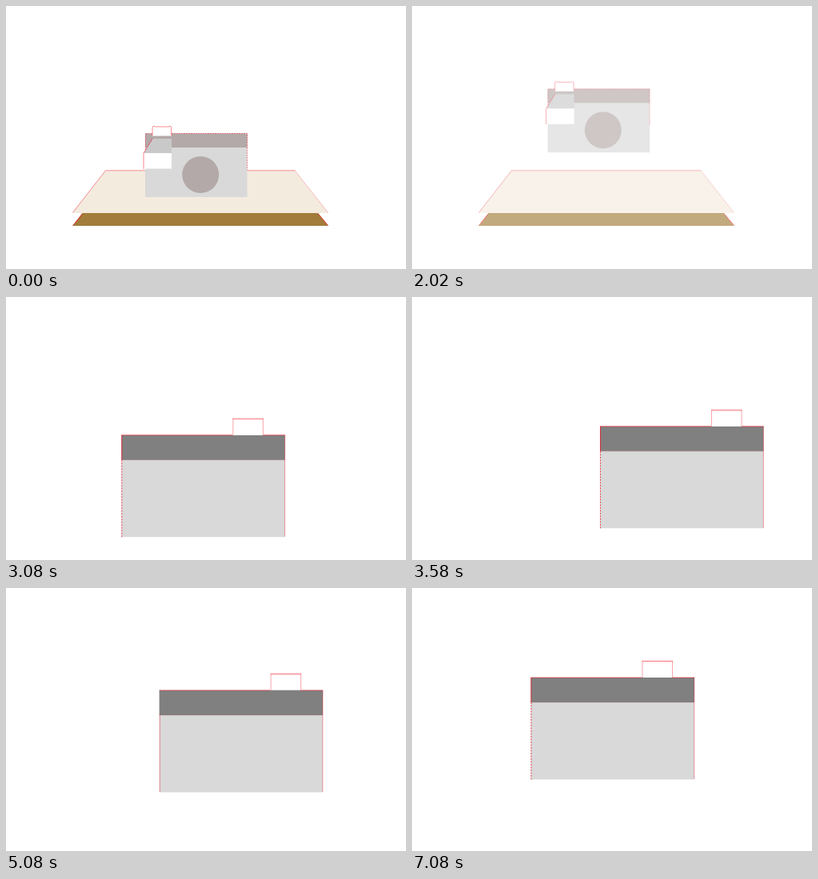
Write an HTML page that moves like this. It is 500 px wide and 329 px high and loops after 8 s.

```html
<!DOCTYPE html>
<html lang="en">
<head>
<meta charset="utf-8">
<title>Camera slides</title>
<style>
  html, body { margin: 0; width: 100%; height: 100%; overflow: hidden; background: #fff; }
  svg { display: block; width: 100vw; height: 100vh; }
  .edge { fill: none; stroke: #f01e2d; stroke-width: 1; }
</style>
</head>
<body>
<svg viewBox="0 0 500 329" preserveAspectRatio="none">
  <g id="desk">
    <path fill="#f4ebdf" d="M124.5 206H361L403 259H83Z"/>
    <path class="edge" stroke-opacity=".5" d="M83.500 258.500L124.500 205.800H361"/>
    <path class="edge" stroke-opacity=".28" d="M361 205.800L402.500 258.500"/>
    <path fill="#a17c3a" d="M95.500 259H390L403 275H83Z"/>
    <path class="edge" stroke-opacity=".85" d="M95.500 260L84 274.500M390 260L402.500 274.500"/>
    <g id="smallCamera">
      <path fill="#d9d9d9" d="M174 159.500H301.500V239H174Z"/>
      <path fill="#b3a9a8" d="M174 159.500H301.500V177H174Z"/>
      <path class="edge" stroke="#8c4646" stroke-opacity=".5" stroke-dasharray="2 1" d="M207 159.500H301.500V177"/>
      <path class="edge" stroke-opacity=".45" stroke-dasharray="2 1" d="M174.500 180V159.500H183M301.500 177V205"/>
      <circle cx="243.200" cy="211" r="23" fill="#b3a9a8"/>
      <path fill="#fff" d="M183 162.500V152Q183 150 185 150H205Q207 150 207 152V162.500Z"/>
      <path class="edge" stroke-opacity=".5" d="M183 162V152Q183 150.300 185 150.300L187 151H203L205 150.300Q206.500 150.300 206.500 152V162"/>
      <path fill="#c9c9c9" d="M183.500 166H207V184H172Z"/>
      <path fill="#fff" d="M172 184H207V203.500H172Z"/>
      <path class="edge" stroke-opacity=".55" d="M183 166L172 184V204"/>
    </g>
  </g>
  <g id="bigCamera">
    <path fill="#d9d9d9" d="M0 51.500H204.500V148.500H0Z"/>
    <path fill="#808080" d="M0 21H204.500V52H0Z"/>
    <path fill="#fff" d="M139 .5H177V21H139Z"/>
    <path class="edge" stroke-opacity=".4" d="M139.500 21V.5M177 .5V21M204.300 21V148"/>
    <path class="edge" stroke-opacity=".6" d="M139 .5H177.500"/>
    <path class="edge" stroke-opacity=".15" d="M140 2H177"/>
    <path class="edge" stroke-opacity=".6" d="M0 21H139M177 21H204.500"/>
    <path class="edge" style="stroke:#a05a5a" stroke-opacity=".35" d="M0 52H204.500"/>
    <g id="softEdge">
      <path class="edge" stroke-opacity=".45" d="M.7 52V148"/>
      <path class="edge" style="stroke:#999" stroke-opacity=".5" d="M139.500 21H177"/>
    </g>
    <g id="crispEdge">
      <path class="edge" stroke-opacity=".8" d="M.5 21V52"/>
      <path class="edge" stroke-opacity=".8" stroke-dasharray="2 1.500" d="M.5 52V148.500"/>
    </g>
  </g>
</svg>
<script>
  const LOOP = 8000, MOVE = 1800;
  const LIFT = 980, FADE = 1740, BLANK = 2540, ENTER = 2750, SETTLE = 4550, SWAP = 6370;
  const [desk, small, big, soft, crisp] =
    ["desk", "smallCamera", "bigCamera", "softEdge", "crispEdge"].map(id => document.getElementById(id));

  const clamp = v => Math.min(1, Math.max(0, v));
  const span = (t, from, length) => clamp((t - from) / length);
  const easeOut = p => 1 - (1 - p) ** 3;
  const place = (el, x, y) => el.setAttribute("transform", `translate(${x.toFixed(2)} ${y.toFixed(2)})`);
  const fade = (el, a) => el.setAttribute("opacity", a.toFixed(3));

  function draw(t) {
    const lift = Math.max(0, t - LIFT);
    place(small, -0.0042 * lift, -0.0535 * lift);
    fade(desk, 1 - span(t, FADE, BLANK - FADE));

    const enter = easeOut(span(t, ENTER, MOVE));
    const settle = easeOut(span(t, SETTLE, MOVE));
    place(big, 37.500 + 234 * enter - 123 * settle, 164.500 - 28 * enter - 45.500 * settle);
    fade(big, t >= ENTER ? 1 : 0);

    const sharp = t < SETTLE ? 1 : span(t, SWAP, 710);
    fade(crisp, sharp);
    fade(soft, 1 - sharp);
  }

  const start = performance.now();
  function tick() {
    draw((performance.now() - start) % LOOP);
    requestAnimationFrame(tick);
  }
  tick();
</script>
</body>
</html>
```
